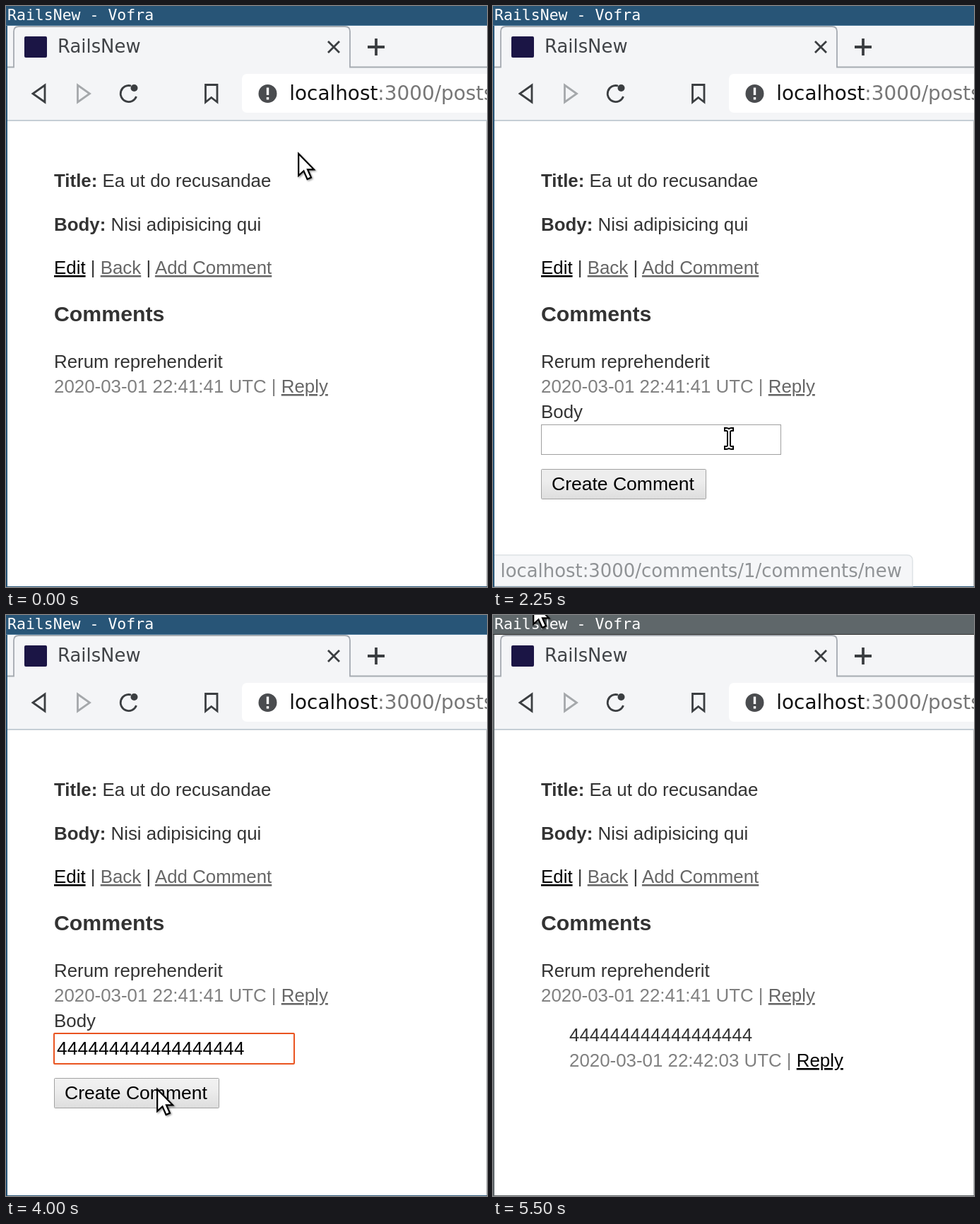
These frames come from a looping animation (681x822 px, 5.75 s). An HTML page:

```html
<!DOCTYPE html>
<html lang="en">
<head>
<meta charset="utf-8">
<title>RailsNew</title>
<style>
  html, body { margin: 0; width: 100%; height: 100%; overflow: hidden; background: #fff; }
  svg { display: block; }
  text { white-space: pre; }
  .page { font: 25.88px "Liberation Sans", Arial, sans-serif; fill: #333; }
  .ui { font: 25.88px "DejaVu Sans", sans-serif; fill: #404347; }
  .field { font-size: 26.53px; fill: #000; }
  .b { font-weight: bold; }
  .meta { fill: #808080; }
  .link { fill: #000; text-decoration: underline; }
  .visited { fill: #666; }
  .icon { fill: none; stroke: #3b3e41; stroke-width: 2.8; }
  #window { --frame: #285577; --edge: #4c7899; }
  #window.inactive { --frame: #5f676a; --edge: #333; }
  .frame { fill: var(--frame); }
  .edge { fill: var(--edge); }
</style>
</head>
<body>
<svg id="window" width="681" height="822" viewBox="0 0 681 822">
  <defs>
    <linearGradient id="face" x2="0" y2="1">
      <stop id="faceTop" stop-color="#ededed"/><stop offset=".38" stop-color="#ededed"/><stop offset="1" stop-color="#dedede"/>
    </linearGradient>
    <filter id="drop" x="-20%" y="-20%" width="150%" height="150%">
      <feDropShadow dx="1.5" dy="1.5" stdDeviation="1.2" flood-opacity=".4"/>
    </filter>
    <filter id="halo" x="-5%" y="-5%" width="110%" height="110%">
      <feDropShadow dx="0" dy="1" stdDeviation="1.5" flood-opacity=".4"/>
    </filter>
  </defs>

  <!-- window frame and browser toolbar -->
  <rect class="frame" width="681" height="822"/>
  <rect class="edge" y="27" width="681" height="1"/>
  <rect x="2" y="28" width="679" height="793" fill="#fff"/>
  <rect x="2" y="28" width="679" height="134" fill="#f4f5f7"/>
  <path d="M2 86.5H11V36Q11 29 18 29H480Q487 29 487 36V86.5H681" fill="none" stroke="#a6abb1" stroke-width="1.8"/>
  <path d="M2 162H681" stroke="#b5c0c8" stroke-width="1.6"/>
  <path d="M680.5 163V821" stroke="#b5b8ba"/>
  <text x="2" y="20" fill="#fff" style="font: 21.5px 'DejaVu Sans Mono', monospace">RailsNew - Vofra</text>
  <rect x="26" y="43" width="32" height="30" rx="2" fill="#1b1545"/>
  <text class="ui" x="73" y="66">RailsNew</text>
  <g class="icon">
    <path d="M456 50L472 66M472 50L456 66"/>
    <path d="M524 46V70M512 58H536" stroke-width="3.8"/>
    <path d="M55 112V136L38 124Z"/>
    <path d="M101.5 112V136L118.5 124Z" stroke="#a5a8ab"/>
    <path d="M177 113A11.5 11.5 0 1 0 184.5 128"/>
    <circle cx="181.5" cy="116" r="5" fill="#3b3e41" stroke="none"/>
    <path d="M282.5 111.5H299V136L290.7 129.5L282.5 136Z"/>
  </g>
  <rect x="334" y="96" width="360" height="55" rx="7" fill="#fff"/>
  <circle cx="370.5" cy="124" r="13" fill="#4a4c4f"/>
  <path d="M370.5 115.5V126M370.5 129V132.5" stroke="#fff" stroke-width="3.4"/>
  <text class="ui" x="401.3" y="133" style="font-size: 27.87px; fill: #111">localhost<tspan fill="#777">:3000/posts/1</tspan></text>

  <!-- post -->
  <g class="page">
    <text x="68" y="256"><tspan class="b">Title:</tspan> Ea ut do recusandae</text>
    <text x="68" y="318"><tspan class="b">Body:</tspan> Nisi adipisicing qui</text>
    <text x="68" y="379"><tspan class="link">Edit</tspan> | <tspan class="link visited">Back</tspan> | <tspan class="link visited">Add Comment</tspan></text>
    <text class="b" x="68" y="446" font-size="30.27">Comments</text>
    <text x="68" y="512">Rerum reprehenderit</text>
    <rect id="hover" x="389" y="523" width="67" height="30" fill="#000"/>
    <text class="meta" x="68" y="547">2020-03-01 22:41:41 UTC | <tspan id="reply" class="link visited">Reply</tspan></text>

    <g id="form">
      <text x="68" y="583">Body</text>
      <rect x="68.5" y="592.5" width="339" height="42" fill="#fff" stroke="#a0a0a0"/>
      <rect id="focus" x="68" y="592" width="340" height="43" rx="1" fill="none" stroke="#e95420" stroke-width="2"/>
      <text id="typed" class="field" x="72" y="622"></text>
      <rect id="caret" y="598" width="1.6" height="30"/>
      <rect x="68.5" y="655.5" width="233" height="42" rx="1" fill="url(#face)" stroke="#a2a2a2"/>
      <text id="label" class="field" x="83" y="685">Create Comment</text>
    </g>

    <g id="answer">
      <text x="108" y="603">444444444444444444</text>
      <text class="meta" x="108" y="639">2020-03-01 22:42:03 UTC | <tspan class="link">Reply</tspan></text>
    </g>
  </g>

  <g id="suggestions" class="ui">
    <rect x="68" y="128" width="382" height="460" rx="4" fill="#fff" filter="url(#halo)"/>
  </g>

  <g id="status" class="ui">
    <path id="bubble" fill="#f2f4f6" stroke="#d4d9dd" stroke-width="1.5"/>
    <text id="address" x="10.5" y="808" fill="#6b6f73"></text>
  </g>

  <!-- pointers -->
  <g id="arrow" filter="url(#drop)">
    <path d="M1.2 2V33L8.5 26.3L13.6 38L19 35.6L14 24.3H23Z" fill="#fff" stroke="#000" stroke-width="2.2"/>
  </g>
  <g id="hand" filter="url(#drop)">
    <path d="M8 21V4Q8 1 10.7 1T13.4 4V13Q13.5 10.5 16 10.5T18.6 13Q19 11 21.3 11.2T23.8 14Q24.3 12.3 26.4 12.6T29 15.4V22L27 27V31H10V27L2 18.5Q0 15.5 2.6 14T6.5 16Z" fill="#fff" stroke="#000" stroke-width="1.9"/>
    <path d="M13.4 13V19M18.6 13V19M23.8 14V19" stroke="#000" stroke-width="1.4"/>
  </g>
  <g id="beam" fill="none" stroke-linecap="square">
    <path id="beamLine" d="M-4 -13Q0 -13 0 -9.5Q0 -13 4 -13M0 -9.5V9.5M-4 13Q0 13 0 9.5Q0 13 4 13"/>
  </g>
</svg>
<script>
const LOOP = 5750, TICK = 250;
const $ = id => document.getElementById(id);
const show = (id, on) => { $(id).style.display = on ? "" : "none"; };
const fours = n => "4".repeat(n);

// [first tick, pointer, x, y]
const moves = [
  [0, "arrow", 413, 207], [1, "arrow", 356, 282], [2, "arrow", 282, 394], [3, "arrow", 371, 483],
  [4, "hand", 401, 531], [5, "hand", 403, 533], [8, "hand", 397, 541],
  [9, "beam", 334, 612], [13, "beam", 311, 615],
  [14, "arrow", 238, 635], [15, "arrow", 219, 656], [16, "arrow", 213, 669],
  [19, "arrow", 130, 347], [20, "arrow", 119, 208], [21, "arrow", 57, -10], [22, "arrow", 56, -20]
];

[18, 16, 13, 10, 7, 4].forEach((count, row) => {
  const text = document.createElementNS("http://www.w3.org/2000/svg", "text");
  text.setAttribute("x", 92);
  text.setAttribute("y", 177 + row * 74);
  text.textContent = fours(count);
  $("suggestions").append(text);
});

// the text pointer is a white line over a thick black one
const core = $("beamLine").cloneNode();
core.removeAttribute("id");
$("beamLine").setAttribute("style", "stroke: #000; stroke-width: 6px");
core.setAttribute("style", "stroke: #fff; stroke-width: 2px");
$("beam").append(core);

function draw(tick) {
  const during = (from, to) => tick >= from && tick < to;

  const hovering = during(4, 9);
  show("hover", hovering);
  $("reply").style.fill = hovering ? "#fff" : "";

  show("form", during(7, 18));
  show("answer", tick >= 18);
  show("focus", during(11, 17));
  show("caret", during(11, 15));
  show("suggestions", tick === 11);
  const count = tick < 11 ? 0 : tick === 11 ? 1 : 18;
  $("typed").textContent = fours(count);
  $("caret").setAttribute("x", 72 + count * 14.75);
  $("faceTop").setAttribute("stop-color", during(15, 17) ? "#f2f2f2" : "#ededed");
  $("label").style.fill = tick === 17 ? "#808080" : "";

  show("status", during(6, 10));
  const wide = tick >= 8;
  $("address").textContent = wide ? "localhost:3000/comments/1/comments/new" : "localhost:300…";
  $("bubble").setAttribute("d", `M2 776.8H${wide ? 586 : 216}q8 0 8 8V821H2`);
  $("status").style.opacity = tick === 9 ? 0.75 : 1;

  const [, pointer, x, y] = moves.findLast(move => move[0] <= tick);
  for (const id of ["arrow", "hand", "beam"]) show(id, id === pointer);
  $(pointer).setAttribute("transform", `translate(${x} ${y})`);
  $("window").classList.toggle("inactive", tick >= 21);
}

const start = performance.now();
function play() {
  draw(Math.floor((performance.now() - start) % LOOP / TICK));
  requestAnimationFrame(play);
}
play();
</script>
</body>
</html>
```
